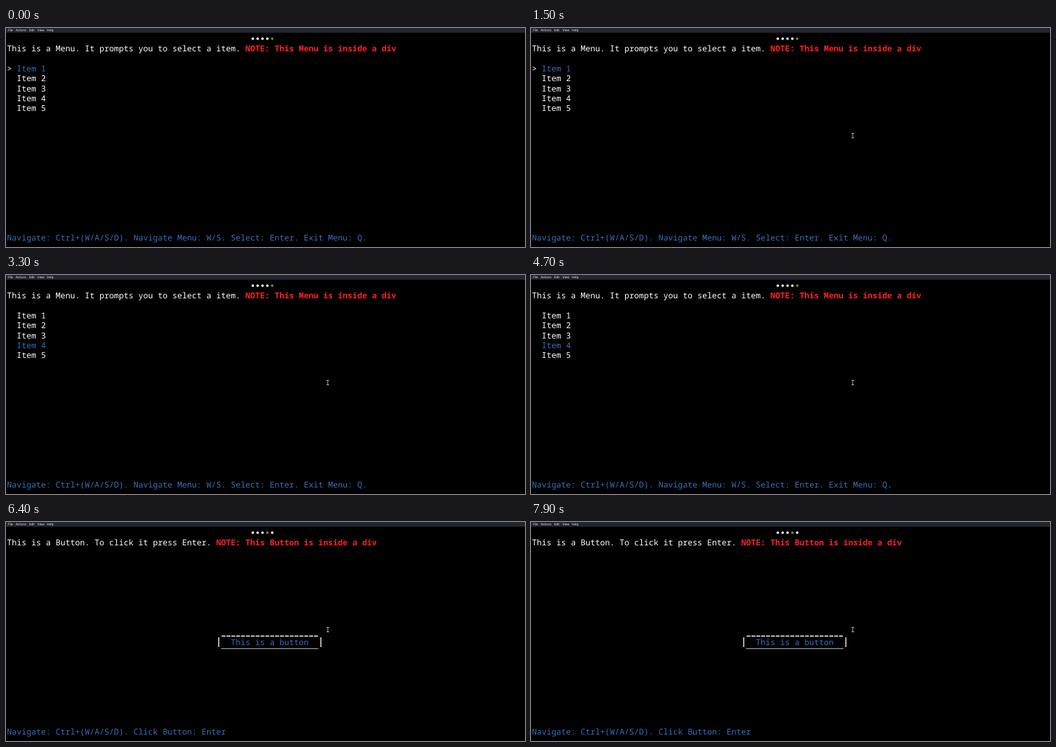
These frames come from a looping animation (800 px wide and 338 px high, 8000 ms). An HTML page with a canvas:

```html
<!DOCTYPE html>
<html lang="en">
<head>
<meta charset="utf-8">
<title>Terminal menu</title>
<style>
html, body { margin: 0; width: 100%; height: 100%; overflow: hidden; background: #000; }
canvas { display: block; width: 800px; height: 338px; }
</style>
</head>
<body>
<canvas id="stage"></canvas>
<script>
const W = 800, H = 338, LOOP = 8000;
const CELL = 7.5, LINE = 15.35, LEFT = 1.6, TOP = 36.3;
const WHITE = '#fff', BLUE = '#3670be', RED = '#fc2124', GREEN = '#4f9a3f';

const canvas = document.getElementById('stage');
const ctx = canvas.getContext('2d');
const dpr = window.devicePixelRatio || 1;
canvas.width = W * dpr;
canvas.height = H * dpr;
ctx.scale(dpr, dpr);
ctx.textRendering = 'geometricPrecision';

const colX = col => LEFT + col * CELL;
const rowY = row => TOP + row * LINE;

// Text on the terminal grid
function print(text, col, row, color, weight = 500) {
  ctx.font = `${weight} 12.5px "Noto Sans Mono", "DejaVu Sans Mono", monospace`;
  ctx.fillStyle = color;
  ctx.fillText(text, colX(col), rowY(row));
}

function rect(x, y, w, h, color) {
  ctx.fillStyle = color;
  ctx.fillRect(x, y, w, h);
}

function menuBar() {
  rect(0, 0, W, 7.4, '#23252f');
  ctx.font = '4.8px "Noto Sans", "Open Sans", sans-serif';
  ctx.fillStyle = '#f2f2f2';
  const labels = { File: 3, Actions: 15, Edit: 35.5, View: 48.5, Help: 63 };
  for (const name in labels) ctx.fillText(name, labels[name], 5.3);
}

function pager(active) {
  for (let i = 0; i < 5; i++) {
    ctx.fillStyle = i === active ? GREEN : WHITE;
    ctx.beginPath();
    ctx.arc(380.4 + i * CELL, 16.5, 1.9, 0, Math.PI * 2);
    ctx.fill();
  }
}

function heading(text, note) {
  print(text, 0, 0, WHITE);
  print(note, text.length + 1, 0, RED, 700);
}

function menuPage(t) {
  const selected = t < 2000 ? 1 : t < 2800 ? 2 : t < 3000 ? 3 : 4;
  const confirmed = t >= 3200;
  pager(4);
  heading('This is a Menu. It prompts you to select a item.',
          'NOTE: This Menu is inside a div');
  for (let i = 1; i <= 5; i++) {
    print('Item ' + i, 2, i + 1, i === selected ? BLUE : WHITE);
  }
  if (!confirmed) print('>', 0, selected + 1, WHITE);
  print('Navigate: Ctrl+(W/A/S/D). Navigate Menu: W/S. Select: Enter. Exit Menu: Q.',
        0, 19, BLUE);
}

function buttonPage() {
  pager(3);
  heading('This is a Button. To click it press Enter.',
          'NOTE: This Button is inside a div');
  for (let c = 44; c < 64; c++) rect(colX(c) + 0.7, 175.3, 6.1, 1.5, WHITE);
  rect(327.2, 178, 1.4, 15, WHITE);
  rect(484.7, 178, 1.4, 15, WHITE);
  rect(colX(44), 195, 20 * CELL, 1, '#bdbdbd');
  print('This is a button', 46, 10, BLUE);
  print('Navigate: Ctrl+(W/A/S/D). Click Button: Enter', 0, 19, BLUE);
}

function pointer(t) {
  if (t < 500) return;
  const p = Math.min(1, Math.max(0, (t - 700) / 600));
  const e = p * p * (3 - 2 * p);
  const x = Math.round(231 + 265 * e), y = Math.round(170 - 4 * e);
  const color = '#b4b4b4';
  rect(x - 0.5, y - 4, 1, 8, color);
  rect(x - 2, y - 4, 4, 1, color);
  rect(x - 2, y + 3, 4, 1, color);
}

function draw(now) {
  const t = Math.floor((now % LOOP) / 100) * 100;
  rect(0, 0, W, H, '#000');
  menuBar();
  if (t < 4900) menuPage(t);
  else buttonPage();
  pointer(t);
  requestAnimationFrame(draw);
}

const start = performance.now();
requestAnimationFrame(function first() {
  const loop = () => {
    draw.call(null, 0);
  };
  draw(Math.max(0, performance.now() - start));
});
</script>
</body>
</html>
```
